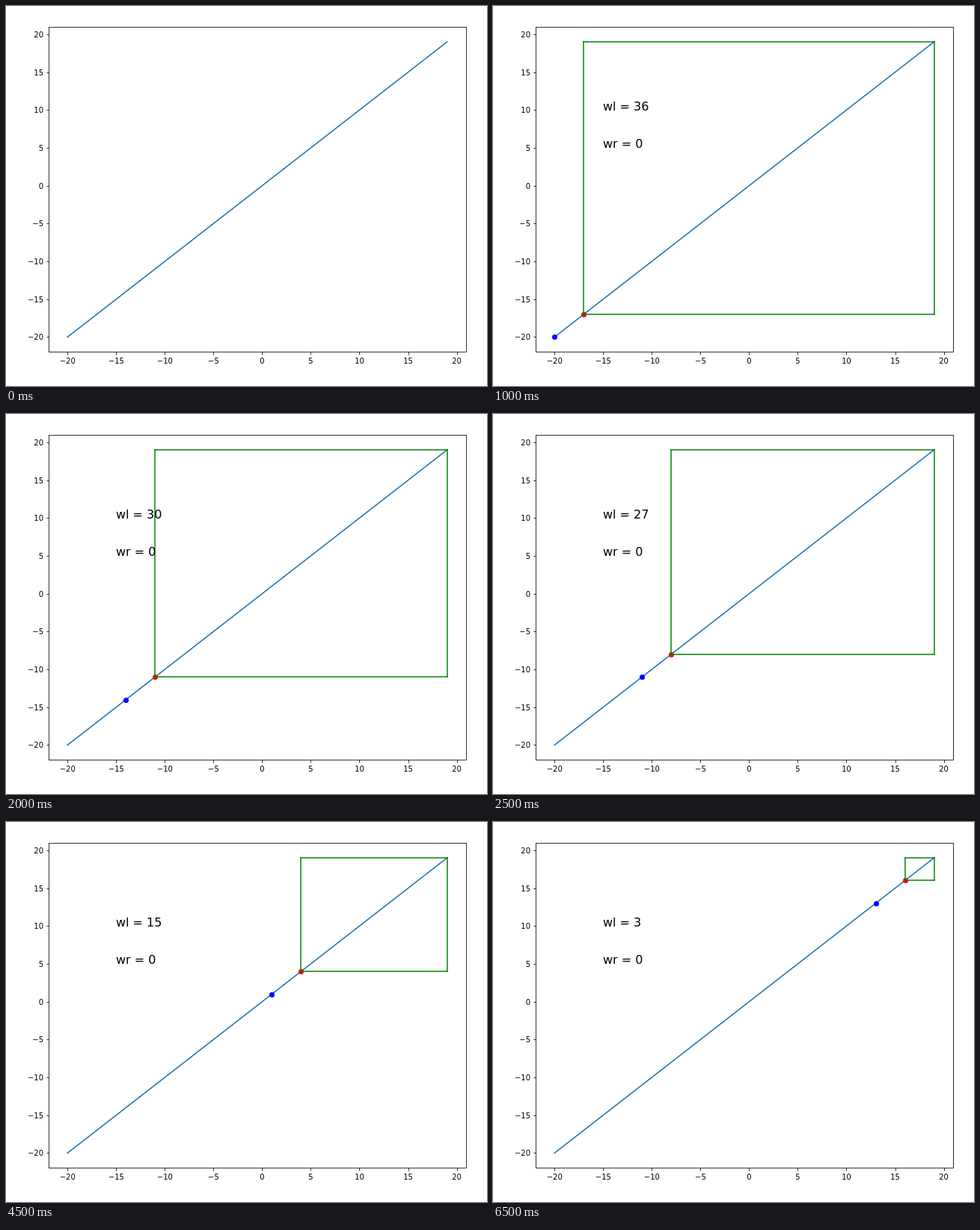
Write an HTML page with a canvas that moves like this. It is 643 px wide and 509 px high and loops after 7000 ms.

```html
<!DOCTYPE html>
<html lang="en">
<head>
<meta charset="utf-8">
<title>Window on a line</title>
<style>
html, body { margin: 0; width: 100%; height: 100%; overflow: hidden; background: #fff; }
canvas { display: block; }
</style>
</head>
<body>
<canvas id="stage" width="643" height="509"></canvas>
<script>
const ctx = document.getElementById('stage').getContext('2d');
const STEP = 500, STEPS = 14;
const MIN = -20, MAX = 19, STRIDE = 3;
const LOW = -21.95, SPAN = 42.9;
const plot = { left: 56.92, bottom: 463.15, width: 558, height: 434.88 };

const px = v => plot.left + (v - LOW) / SPAN * plot.width;
const py = v => plot.bottom - (v - LOW) / SPAN * plot.height;
const snapX = v => Math.round(px(v));
const snapY = v => Math.round(py(v));

function line(x1, y1, x2, y2, color, width, cap) {
  ctx.strokeStyle = color;
  ctx.lineWidth = width;
  ctx.lineCap = cap;
  ctx.beginPath();
  ctx.moveTo(x1, y1);
  ctx.lineTo(x2, y2);
  ctx.stroke();
}

function dot(v, radius, color) {
  ctx.fillStyle = color;
  ctx.beginPath();
  ctx.arc(snapX(v) + 0.5, snapY(v) + 0.5, radius, 0, Math.PI * 2);
  ctx.fill();
}

function label(text, x, y, size, align) {
  ctx.fillStyle = '#000';
  ctx.font = size + 'px "DejaVu Sans", sans-serif';
  ctx.textAlign = align;
  ctx.fillText(text, x, y);
}

function drawAxes() {
  for (let v = -20; v <= 20; v += 5) {
    const x = snapX(v) + 0.5, y = snapY(v) + 0.5;
    const text = String(v).replace('-', '\u2212');
    line(x, 463.5, x, 467.5, '#000', 0.8, 'butt');
    line(54.5, y, 57.5, y, '#000', 0.8, 'butt');
    label(text, px(v), 479, 10, 'center');
    label(text, 50, snapY(v) + 4, 10, 'right');
  }
  ctx.strokeStyle = '#000';
  ctx.lineWidth = 0.8;
  ctx.strokeRect(57.5, 28.5, 558, 435);
}

function drawWindow(start) {
  const l = snapX(start), r = snapX(MAX), t = snapY(MAX), b = snapY(start);
  const edge = (...p) => line(...p, '#008000', 1.5, 'square');
  edge(l, b, r, b);
  edge(l, t, r, t);
  edge(l, b, l, t);
  edge(r, b, r, t);
}

function draw(step) {
  ctx.fillStyle = '#fff';
  ctx.fillRect(0, 0, 643, 509);
  line(px(MIN), py(MIN), px(MAX), py(MAX), '#1f77b4', 1.5, 'square');

  if (step > 0) {
    const first = step === 1;
    const start = MIN + STRIDE * (step - 1);
    dot(first ? MIN : start - STRIDE, first ? 5.5 : 3.5, '#00f');
    dot(first ? MAX : start, 3.5, '#f00');
    drawWindow(start);
  }

  drawAxes();

  if (step > 0) {
    const wl = MAX - MIN - STRIDE * (step - 1);
    label('wl = ' + wl, 147, 140, 16, 'left');
    label('wr = 0', 147, 190, 16, 'left');
  }
}

const begin = performance.now();
function tick() {
  const time = Math.max(0, performance.now() - begin);
  draw(Math.floor(time / STEP) % STEPS);
  requestAnimationFrame(tick);
}
tick();
</script>
</body>
</html>
```
